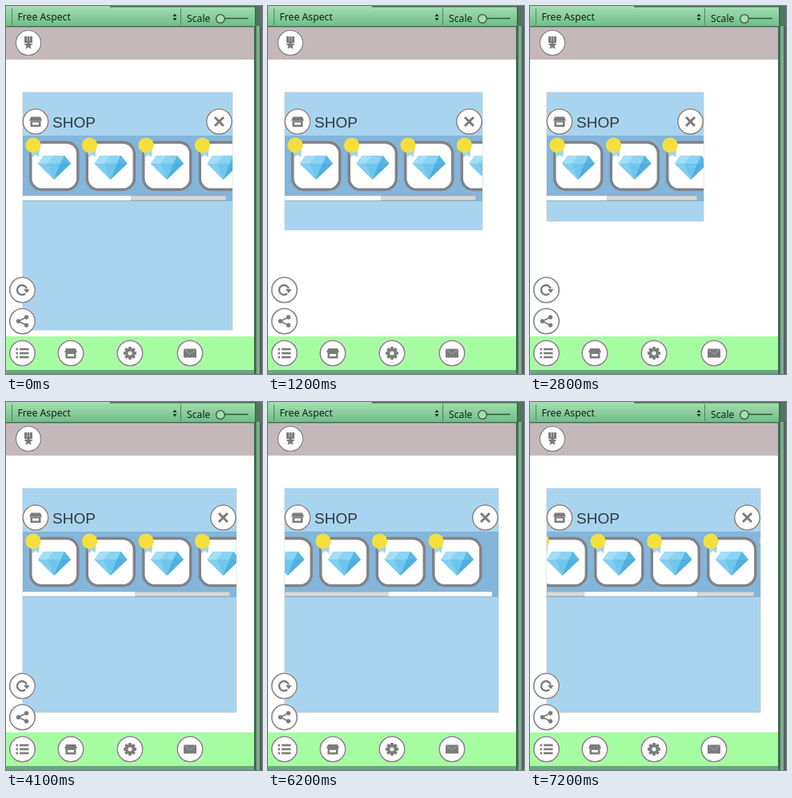
Animation of 320 by 460 pixels, one loop 7300 ms. Source, as an HTML page with a canvas:

```html
<!DOCTYPE html>
<html>
<head>
<meta charset="utf-8">
<style>
html, body { margin: 0; width: 100%; height: 100%; overflow: hidden; background: #fff; }
canvas { display: block; }
</style>
</head>
<body>
<canvas width="320" height="460"></canvas>
<script>
const c = document.querySelector('canvas').getContext('2d');
const LOOP = 7300, STEP = 100, CONTENT = 493, PITCH = 70.5, LEFT = 21, TOP = 108;
const GRAY = '#7b7b7b';

// Keys: time, then values, eased between neighbours.
const sizeKeys = [[0, 262, 297], [1200, 247, 172], [2800, 196, 161], [3900, 267, 280]];
const scrollKeys = [[4300, 0], [4700, 12], [4800, 12], [5500, 99], [6200, 247], [7200, 90]];

function sample(keys, t) {
  let i = keys.findIndex(k => k[0] > t);
  if (i < 0) return keys[keys.length - 1].slice(1);
  if (i === 0) return keys[0].slice(1);
  const a = keys[i - 1], b = keys[i];
  const p = (t - a[0]) / (b[0] - a[0]), e = p * p * (3 - 2 * p);
  return a.slice(1).map((v, j) => v + (b[j + 1] - v) * e);
}

function rect(x, y, w, h, fill) {
  c.fillStyle = fill;
  c.fillRect(x, y, w, h);
}

function poly(fill, ...p) {
  c.beginPath();
  for (let i = 0; i < p.length; i += 2) c.lineTo(p[i], p[i + 1]);
  c.closePath();
  c.fillStyle = fill;
  c.fill();
}

function disc(x, y, r, fill) {
  c.beginPath();
  c.arc(x, y, r, 0, 7);
  c.fillStyle = fill;
  c.fill();
}

function line(color, width, ...p) {
  c.beginPath();
  for (let i = 0; i < p.length; i += 2) c.lineTo(p[i], p[i + 1]);
  c.strokeStyle = color;
  c.lineWidth = width;
  c.stroke();
}

function text(s, x, y, font, fill) {
  c.font = font;
  c.fillStyle = fill;
  c.fillText(s, x, y);
}

const icons = {
  badge() {
    rect(-5, -8, 10, 8, GRAY);
    rect(-2, -8, 1, 6, '#bbb');
    rect(1, -8, 1, 6, '#bbb');
    const star = [];
    for (let i = 0; i < 10; i++) {
      const r = i % 2 ? 2.7 : 6, a = i * Math.PI / 5 - Math.PI / 2;
      star.push(r * Math.cos(a), 3 + r * Math.sin(a));
    }
    poly(GRAY, ...star);
  },
  shop() {
    poly(GRAY, -6, -6, 6, -6, 8, -1, -8, -1);
    rect(-6.5, -1, 13, 7.5, GRAY);
    rect(-4, 1, 8, 3, '#fff');
  },
  close() {
    line(GRAY, 3, -5.5, -5.5, 5.5, 5.5);
    line(GRAY, 3, 5.5, -5.5, -5.5, 5.5);
  },
  refresh() {
    c.beginPath();
    c.arc(-.5, 0, 6, .8, 6);
    c.strokeStyle = GRAY;
    c.lineWidth = 2.3;
    c.stroke();
    poly(GRAY, 1.5, -1, 9, -1, 5.5, 4);
  },
  share() {
    line(GRAY, 1.8, 5, -5, -5, 0, 5, 5);
    disc(5, -5, 2.7, GRAY);
    disc(-5, 0, 2.7, GRAY);
    disc(5, 5, 2.7, GRAY);
  },
  list() {
    for (const y of [-5, 0, 5]) {
      rect(-8, y - 1.3, 2.6, 2.6, GRAY);
      rect(-3.5, y - 1.3, 11.5, 2.6, GRAY);
    }
  },
  gear() {
    for (let i = 0; i < 4; i++) {
      const a = i * Math.PI / 4, x = 8 * Math.cos(a), y = 8 * Math.sin(a);
      line(GRAY, 3.6, -x, -y, x, y);
    }
    disc(0, 0, 6.2, GRAY);
    disc(0, 0, 2.6, '#fff');
  },
  mail() {
    rect(-8, -5.5, 16, 11, GRAY);
    line('#aaa', 1, -8, -5, 0, 1, 8, -5);
  }
};

function button(x, y, icon) {
  disc(x, y, 16.8, '#fff');
  c.beginPath();
  c.arc(x, y, 15.8, 0, 7);
  c.strokeStyle = '#858585';
  c.lineWidth = 1.6;
  c.stroke();
  c.save();
  c.translate(x, y);
  icons[icon]();
  c.restore();
}

function item(x) {
  c.save();
  c.translate(x, 169);
  c.beginPath();
  c.roundRect(1.8, 1.5, 59, 59, 14);
  c.fillStyle = '#fff';
  c.fill();
  c.strokeStyle = '#818287';
  c.lineWidth = 3.4;
  c.stroke();
  poly('#6fc6ec', 18, 18, 44, 18, 52, 28, 31, 48, 11, 28);
  poly('#a3def6', 18, 18, 31, 18, 23, 28, 11, 28);
  poly('#8ad3f3', 31, 18, 44, 18, 39, 28, 23, 28);
  poly('#58b7e5', 44, 18, 52, 28, 39, 28);
  poly('#82cdf0', 11, 28, 23, 28, 31, 48);
  poly('#50aee0', 39, 28, 52, 28, 31, 48);
  poly('#9fd5ec', 2, 12, 13, 11, 12, 20, 8, 17, 4, 20);
  disc(5, 5, 9.6, '#f5df3e');
  c.restore();
}

function chrome() {
  rect(0, 0, 320, 460, '#6fa384');
  rect(310, 0, 3, 460, '#3f6d52');
  rect(313, 0, 4, 460, '#82ab91');
  rect(317, 0, 3, 460, '#52665a');
  rect(313, 0, 7, 25, '#53745f');
  rect(0, 27, 310, 428, '#fff');
  const g = c.createLinearGradient(0, 0, 0, 26);
  g.addColorStop(0, '#a3dfb1');
  g.addColorStop(1, '#6fbc87');
  rect(0, 0, 311, 26, g);
  rect(130, 0, 181, 1.5, '#426d50');
  rect(0, 25, 311, 1.5, '#42694f');
  rect(7, 3, 1, 21, '#548465');
  rect(218, 3, 1, 21, '#548465');
  const font = '500 12.2px "Noto Sans", "Open Sans", sans-serif';
  text('Free Aspect', 14.5, 17.5, font, '#142219');
  text('Scale', 226, 19.5, font, '#142219');
  poly('#203227', 208.5, 13, 211, 9.5, 213.5, 13);
  poly('#203227', 208.5, 15, 211, 18.5, 213.5, 15);
  line('#37553f', 1.6, 268, 15.5, 303, 15.5);
  disc(268, 16, 6, '#37553f');
  disc(268, 16, 4.7, '#a9dcb5');
  rect(0, 26.5, 310, 40.5, '#c4b8ba');
  rect(0, 413, 310, 42, '#a6fca0');
}

function panel(w, h, scroll) {
  rect(LEFT, TOP, w, h, '#a8d4ef');
  c.strokeStyle = '#b9cbd5';
  c.lineWidth = .8;
  c.strokeRect(LEFT, TOP, w, h);
  rect(LEFT, 162, w, 82, '#84b5da');
  c.save();
  c.beginPath();
  c.rect(LEFT, 162, w, 82);
  c.clip();
  for (let i = 0; i < 7; i++) item(29 + i * PITCH - scroll);
  c.restore();

  const track = w - 8, from = track * scroll / CONTENT;
  const to = Math.min(track, track * (scroll + w) / CONTENT);
  rect(LEFT, 236.5, track, 7, '#a0a9b0');
  rect(LEFT + .5, 237.5, track - 1, 5, '#d7d9db');
  rect(LEFT + from, 237.5, to - from, 5.5, '#fff');

  button(37, 144.5, 'shop');
  text('SHOP', 58, 151.5, '19px "Liberation Sans", Arial, sans-serif', '#333a3f');
  button(LEFT + w - 16.5, 144.5, 'close');
}

function draw(now) {
  const t = Math.floor(now % LOOP / STEP) * STEP;
  const [w, h] = sample(sizeKeys, t), [scroll] = sample(scrollKeys, t);
  chrome();
  button(28, 46, 'badge');
  panel(w, h, scroll);
  button(20.5, 355, 'refresh');
  button(20.5, 394, 'share');
  button(20.5, 434, 'list');
  button(81, 434, 'shop');
  button(155, 434, 'gear');
  button(230, 434, 'mail');
}

const start = performance.now();
function frame() {
  draw(performance.now() - start);
  requestAnimationFrame(frame);
}
frame();
</script>
</body>
</html>
```
